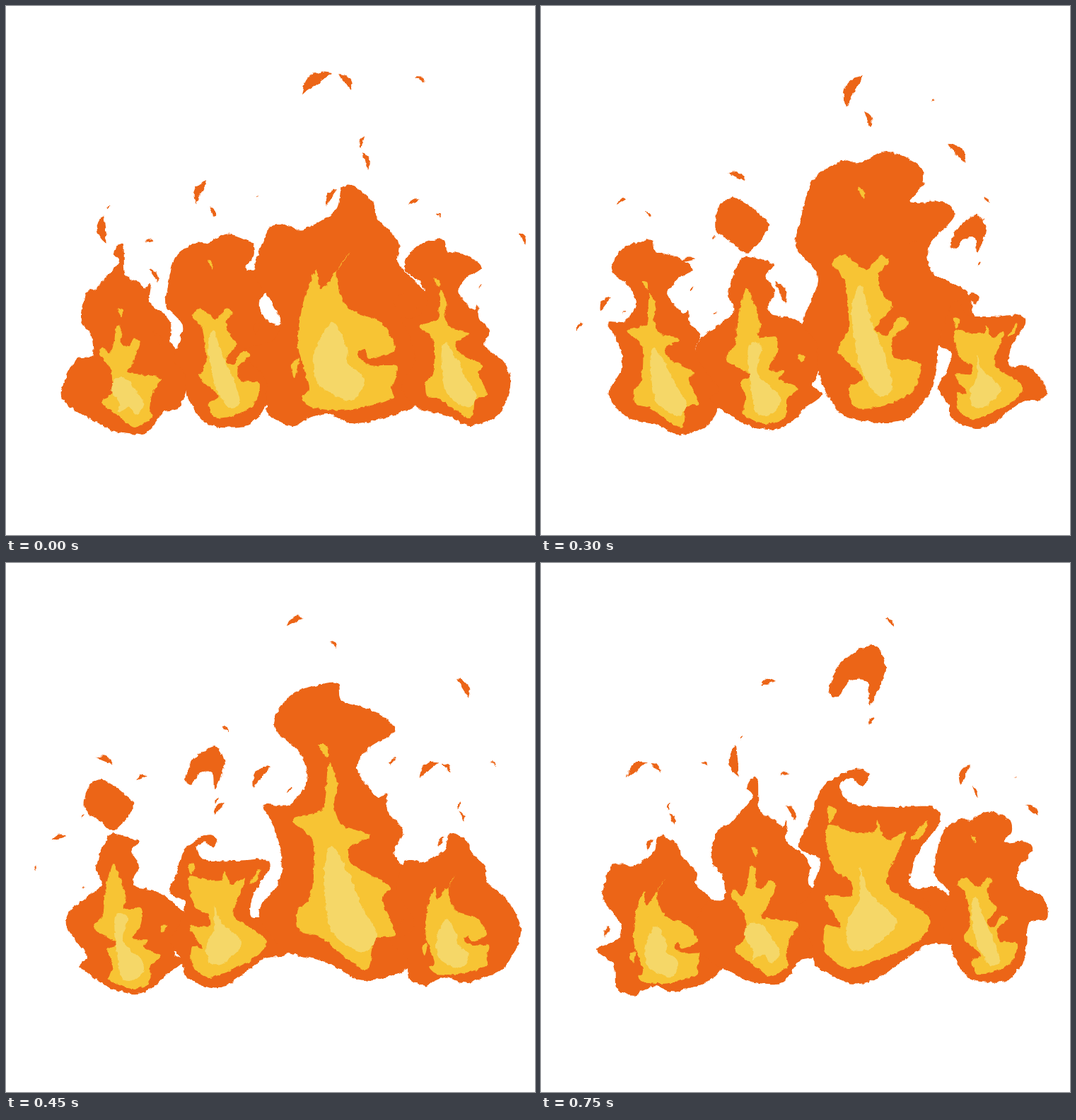
Animation of 748 by 748 pixels, one loop 0.9 s. Source, as an HTML page:

```html
<!DOCTYPE html>
<html lang="en">
<head>
<meta charset="utf-8">
<title>Flames</title>
<style>
  html, body { margin: 0; width: 100%; height: 100%; overflow: hidden; background: #fff; }
  svg { display: block; width: 100%; height: 100%; }
  .frame {
    visibility: hidden;
    animation: show 900ms step-end infinite;
    animation-delay: calc(var(--i) * 150ms - 900ms);
  }
  @keyframes show {
    0% { visibility: visible; }
    16.6667%, 100% { visibility: hidden; }
  }
  .outer { fill: #ec6517; }
  .inner { fill: #f7c434; }
  .core { fill: #f5d768; }
</style>
</head>
<body>
<svg id="stage" viewBox="0 0 748 748">
  <filter id="rough" filterUnits="userSpaceOnUse" x="0" y="0" width="748" height="748" color-interpolation-filters="sRGB">
    <feTurbulence type="fractalNoise" baseFrequency=".13" numOctaves="2" seed="4" result="noise"/>
    <feDisplacementMap in="SourceGraphic" in2="noise" scale="6" xChannelSelector="R" yChannelSelector="G"/>
  </filter>
</svg>
<script>
const poses = [];

const points = text => text.split(" ").map(p => p.split(",").map(Number));

// Closed Catmull-Rom curve through a few points.
function curve(text) {
  const pts = points(text);
  const at = i => pts[(i + pts.length) % pts.length];
  const handle = (i, side) =>
    [0, 1].map(k => (at(i)[k] + side * (at(i + 1)[k] - at(i - 1)[k]) / 7).toFixed(1));
  return `M${pts[0]}` + pts.map((_, i) =>
    `C${handle(i, 1)} ${handle(i + 1, -1)} ${at(i + 1)}`).join("") + "Z";
}

// Crescent between two tips, bulging to the left of its direction.
function spark(text) {
  const [[x, y], [u, v]] = points(text);
  const bend = k => `${(x + u) / 2 + k * (v - y)},${(y + v) / 2 - k * (u - x)}`;
  return `M${x},${y}Q${bend(.55)} ${u},${v}Q${bend(-.02)} ${x},${y}Z`;
}

const each = (text, draw) => text.split("/").map(draw).join("");

function pose(outer, sparks, inner, core) {
  poses.push({
    outer: each(outer, curve) + each(sparks, spark),
    inner: each(inner, curve),
    core: curve(core)
  });
}

// The burning cycle.
pose(
  "372,315 397,310 420,316 465,290 475,258 490,254 520,278 524,298 556,335 555,365 601,413 627,473 612,525 577,567 510,589 485,589 455,576 425,584 405,594 370,575 367,525 331,490 378,472 388,445 370,411 351,375",
  "418,125 462,94/470,97 489,119/453,283 468,259/502,202 507,184/504,207 511,232/578,100 592,109/353,465 363,440",
  "488,346 468,375 474,410 487,430 530,448 550,485 515,499 508,485 497,493 515,508 553,510 545,540 545,556 485,571 435,568 418,553 429,540 413,480 420,420 439,373 446,400/403,507 415,499 408,525",
  "462,447 483,485 483,505 507,528 488,558 442,535 436,490"
);
pose(
  "459,200 470,181 482,183 482,245 505,260 524,277 536,269 532,308 560,333 577,362 572,395 611,448 602,495 580,538 545,546 510,587 450,583 405,560 345,519 331,488 366,422 402,416 402,372 382,337 395,282 422,267 470,216",
  "534,236 552,266/445,176 443,113/527,178 547,175/453,103 457,94",
  "458,353 468,362 466,390 480,400 494,384 506,395 485,440 476,457 545,470 528,500 519,535 522,555 485,574 455,550 418,518 440,495 440,447 417,410 425,398 440,412 451,385/463,317 474,320 470,336",
  "475,470 488,490 508,525 490,548 475,530 452,540 455,520 438,490 450,467"
);
pose(
  "365,310 385,245 428,219 448,222 490,206 535,225 540,252 522,277 570,277 584,298 548,340 555,378 602,404 609,450 568,460 558,515 550,547 510,587 430,580 395,527 390,477 370,448 392,385 361,342",
  "431,143 455,98/457,149 466,172/574,195 600,222/552,135 558,133/331,390 345,421",
  "428,351 452,370 462,372 480,353 492,362 477,380 485,410 497,425 473,455 490,465 505,440 522,448 497,470 500,497 537,505 525,545 485,565 445,568 435,540 455,525 420,488 435,455 430,390 412,365/448,257 458,262 456,273",
  "452,395 467,445 485,490 497,540 475,550 450,505 439,430"
);
pose(
  "378,230 405,185 466,169 476,195 520,209 551,237 515,260 496,290 525,330 538,325 540,352 562,380 549,413 592,455 602,504 577,565 540,585 500,590 455,565 400,550 368,520 358,490 386,450 390,412 377,370 364,342 400,342 426,308 415,268",
  "350,317 374,287/397,90 421,77/458,110 468,121/637,163 654,191/397,325 405,319/543,285 552,276/296,355 310,339",
  "457,283 469,315 463,340 475,370 515,385 486,402 490,425 543,458 531,475 550,525 522,532 508,575 445,530 415,520 412,490 430,470 435,395 405,363 445,350 452,320/442,258 455,260 454,275",
  "460,400 485,440 503,485 524,525 505,550 460,520 450,440"
);
pose(
  "408,145 435,130 463,145 488,168 503,192 460,242 430,220 398,190/440,263 455,248 508,266 493,290 509,320 495,345 500,366 545,378 598,424 602,456 573,510 592,530 554,557 520,586 480,594 425,575 370,529 386,507 346,443 357,406 424,358 416,322 428,283",
  "428,82 463,99/325,254 355,249/390,211 397,205/383,362 391,358/286,319 290,308/687,124 698,135",
  "452,313 466,345 476,385 472,410 508,412 505,445 488,475 518,480 508,496 543,515 521,535 515,572 480,583 432,562 440,530 430,497 452,485 405,450 425,420 432,370/546,450 562,452 552,465",
  "455,420 478,430 465,480 508,530 490,562 457,555 448,450"
);
pose(
  "377,370 400,315 445,291 464,299 455,316 438,303 422,316 440,340 500,345 555,345 564,365 530,415 524,458 567,462 605,515 585,538 545,541 481,584 440,595 390,570 382,537 360,497 381,465 394,420 365,403/407,180 425,140 470,116 487,150 465,201 462,168 437,167 420,189",
  "465,230 471,218/486,77 499,90/311,173 333,167",
  "410,370 440,380 470,380 476,363 488,392 515,380 505,410 490,455 548,500 540,528 505,550 435,573 402,548 403,512 424,514 401,472 438,472 438,450 414,432 402,385/405,345 418,350 408,368/546,364 540,385 523,391",
  "452,430 463,465 503,508 465,545 437,545 432,510 450,475"
);

// Every flame runs the same cycle, placed and started differently.
const flames = [
  { phase: 1, place: "translate(-157 236) rotate(-3.1) scale(.658)" },
  { phase: 2, place: "translate(-43.7 194.7) rotate(-3.1) scale(.713)" },
  { phase: 0, place: "" },
  { phase: 3, place: "translate(317.7 238.9) rotate(-3.1) scale(.6295)" }
];

function add(parent, name, attrs) {
  const node = document.createElementNS("http://www.w3.org/2000/svg", name);
  for (const key in attrs) node.setAttribute(key, attrs[key]);
  return parent.appendChild(node);
}

const stage = document.getElementById("stage");
poses.forEach((_, i) => {
  const frame = add(stage, "g", { class: "frame", style: `--i:${i}`, filter: "url(#rough)" });
  for (const layer of ["outer", "inner", "core"]) {
    for (const { phase, place } of flames) {
      const d = poses[(i + phase) % poses.length][layer];
      add(frame, "path", { class: layer, transform: place, d });
    }
  }
});
</script>
</body>
</html>
```
